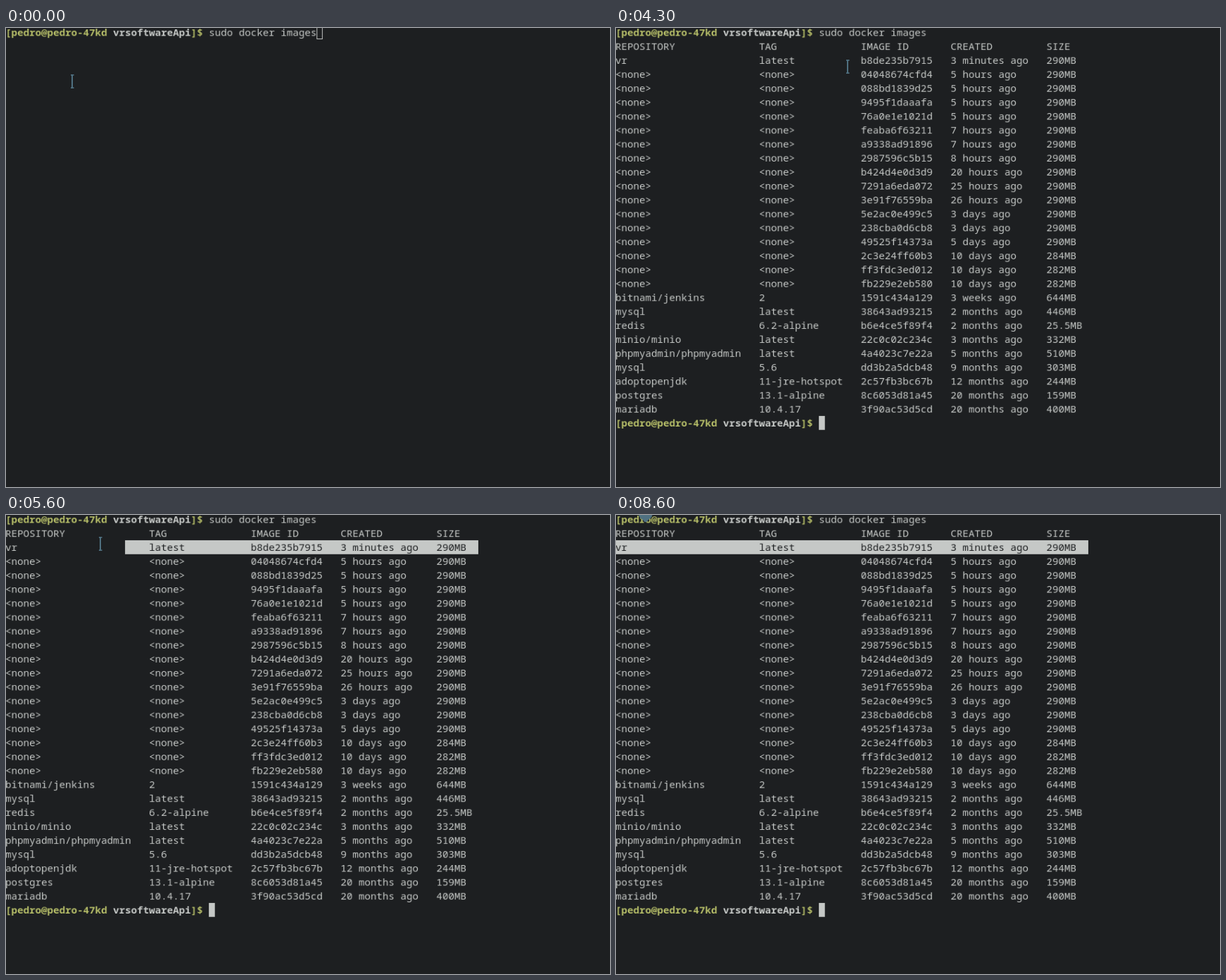
Recreate the animation shown at these times as an HTML page with a canvas. Size 858x653 px, loop 8.7 s.

```html
<!DOCTYPE html>
<html lang="en">
<head>
<meta charset="utf-8">
<title>Terminal</title>
<style>
html, body { margin: 0; height: 100%; overflow: hidden; background: #1d1f21; }
canvas { display: block; }
</style>
</head>
<body>
<canvas id="stage" width="858" height="653"></canvas>
<script>
// The terminal is drawn on a whole-pixel grid, then scaled down to the stage.
const stage = document.getElementById('stage').getContext('2d');
const screen = Object.assign(document.createElement('canvas'), { width: 908, height: 691 });
const ctx = screen.getContext('2d');
const SCALE = 858 / 908;
const LOOP = 8700, STEP = 100;
const CELL_W = 9, CELL_H = 21, LEFT = -1, TOP = -4, ASCENT = 16;
const BG = '#1d1f21', FG = '#c5c8c6', GREEN = '#b5bd68', POINTER = '#4f7080';
const FONT = '15px "Noto Sans Mono", monospace';
const TABS = [0, 24, 41, 56, 72];
const ANCHOR = { row: 2, col: 79 };

const none = '<none>|<none>|';
const table = `REPOSITORY|TAG|IMAGE ID|CREATED|SIZE
vr|latest|b8de235b7915|3 minutes ago|290MB
${none}04048674cfd4|5 hours ago|290MB
${none}088bd1839d25|5 hours ago|290MB
${none}9495f1daaafa|5 hours ago|290MB
${none}76a0e1e1021d|5 hours ago|290MB
${none}feaba6f63211|7 hours ago|290MB
${none}a9338ad91896|7 hours ago|290MB
${none}2987596c5b15|8 hours ago|290MB
${none}b424d4e0d3d9|20 hours ago|290MB
${none}7291a6eda072|25 hours ago|290MB
${none}3e91f76559ba|26 hours ago|290MB
${none}5e2ac0e499c5|3 days ago|290MB
${none}238cba0d6cb8|3 days ago|290MB
${none}49525f14373a|5 days ago|290MB
${none}2c3e24ff60b3|10 days ago|284MB
${none}ff3fdc3ed012|10 days ago|282MB
${none}fb229e2eb580|10 days ago|282MB
bitnami/jenkins|2|1591c434a129|3 weeks ago|644MB
mysql|latest|38643ad93215|2 months ago|446MB
redis|6.2-alpine|b6e4ce5f89f4|2 months ago|25.5MB
minio/minio|latest|22c0c02c234c|3 months ago|332MB
phpmyadmin/phpmyadmin|latest|4a4023c7e22a|5 months ago|510MB
mysql|5.6|dd3b2a5dcb48|9 months ago|303MB
adoptopenjdk|11-jre-hotspot|2c57fb3bc67b|12 months ago|244MB
postgres|13.1-alpine|8c6053d81a45|20 months ago|159MB
mariadb|10.4.17|3f90ac53d5cd|20 months ago|400MB`.split('\n').map(line => line.split('|'));

const HOME = { x: 94, y: 76 };
const moves = [
  { start: 4200, end: 4300, x: 329, y: 55 },
  { start: 4300, end: 4900, x: 668, y: 49 },
  { start: 5000, end: 5200, x: 579, y: 35 },
  { start: 5200, end: 5300, x: 487, y: 33 },
  { start: 5300, end: 5500, x: 173, y: 40 },
  { start: 5500, end: 5600, x: 134, y: 41 },
  { start: 5600, end: 5830, x: 8, y: 43 },
  { start: 6300, end: 6400, x: 8, y: 59 },
  { start: 6700, end: 7000, x: 10, y: 44 },
  { start: 7200, end: 7500, x: 199, y: 251 },
  { start: 7500, end: 7700, x: 40, y: 47 },
  { start: 7700, end: 8100, x: 30, y: 39 },
  { start: 8100, end: 8600, x: 42, y: 0 }
];

function pointerAt(t) {
  let { x, y } = HOME;
  for (const m of moves) {
    const k = Math.min(1, Math.max(0, (t - m.start) / (m.end - m.start)));
    x += (m.x - x) * k;
    y += (m.y - y) * k;
  }
  return { x, y };
}

const cellX = col => LEFT + col * CELL_W;
const cellY = row => TOP + row * CELL_H;

// The selection trails the pointer by one step.
function selectionStart(t) {
  if (t < 5200) return null;
  if (t >= 6000) return { row: 2, col: 0 };
  const { x, y } = pointerAt(t - STEP);
  return {
    row: Math.floor((y / SCALE - TOP) / CELL_H),
    col: Math.floor((x / SCALE - LEFT) / CELL_W)
  };
}

function isSelected(start, row, col) {
  if (!start) return false;
  const order = cell => cell.row * 1000 + cell.col;
  const at = order({ row, col });
  return at >= order(start) && at < order(ANCHOR);
}

function text(str, row, col, color = FG, bold = false, start = null) {
  ctx.font = (bold ? 'bold ' : '') + FONT;
  [...str].forEach((ch, i) => {
    ctx.fillStyle = isSelected(start, row, col + i) ? BG : color;
    ctx.fillText(ch, cellX(col + i), cellY(row) + ASCENT);
  });
}

function prompt(row) {
  text('[pedro@pedro-47kd', row, 0, GREEN, true);
  text('vrsoftwareApi', row, 18, FG, true);
  text(']$', row, 31, GREEN, true);
}

function block(row, col, endX = cellX(col + 1)) {
  ctx.fillStyle = FG;
  ctx.fillRect(cellX(col), cellY(row), endX - cellX(col), CELL_H);
}

function drawSelection(start) {
  if (!start) return;
  for (let row = start.row; row <= ANCHOR.row; row++) {
    block(row, row === start.row ? start.col : 0,
      row === ANCHOR.row ? cellX(ANCHOR.col) : screen.width);
  }
}

function drawCursor(t) {
  if (t < 1800) {
    ctx.strokeStyle = FG;
    ctx.strokeRect(cellX(52) + 0.5, cellY(0) + 0.5, CELL_W - 1, CELL_H - 1);
  } else if (t < 2200) block(0, 52);
  else if (t < 2300) block(1, 0);
  else block(28, 34);
}

function drawPointer(t) {
  const { x, y } = pointerAt(t);
  stage.fillStyle = POINTER;
  if (t >= 8600) {
    stage.fill(new Path2D('M32.5 0H51.5Q51 4 47 6L43.5 9.5Q42 11 40.5 9.5L37 6Q33 4 32.5 0Z'));
    return;
  }
  stage.fillRect(x - 1, y - 10, 2, 20);
  stage.fillRect(x - 2, y - 10, 4.5, 1.7);
  stage.fillRect(x - 2, y + 8.3, 4.5, 1.7);
}

function draw(now) {
  const t = Math.floor(now % LOOP / STEP) * STEP;
  const start = selectionStart(t);
  ctx.fillStyle = BG;
  ctx.fillRect(0, 0, screen.width, screen.height);
  drawSelection(start);
  prompt(0);
  text('sudo docker images', 0, 34);
  if (t >= 2300) {
    table.forEach((line, r) => line.forEach((s, c) => text(s, r + 1, TABS[c], FG, false, start)));
    prompt(28);
  }
  drawCursor(t);
  stage.imageSmoothingQuality = 'high';
  stage.drawImage(screen, 0, 0, 858, 653);
  drawPointer(t);
}

let origin;
function frame(now) {
  origin ??= now;
  draw(now - origin);
  requestAnimationFrame(frame);
}
draw(0);
requestAnimationFrame(frame);
</script>
</body>
</html>
```
